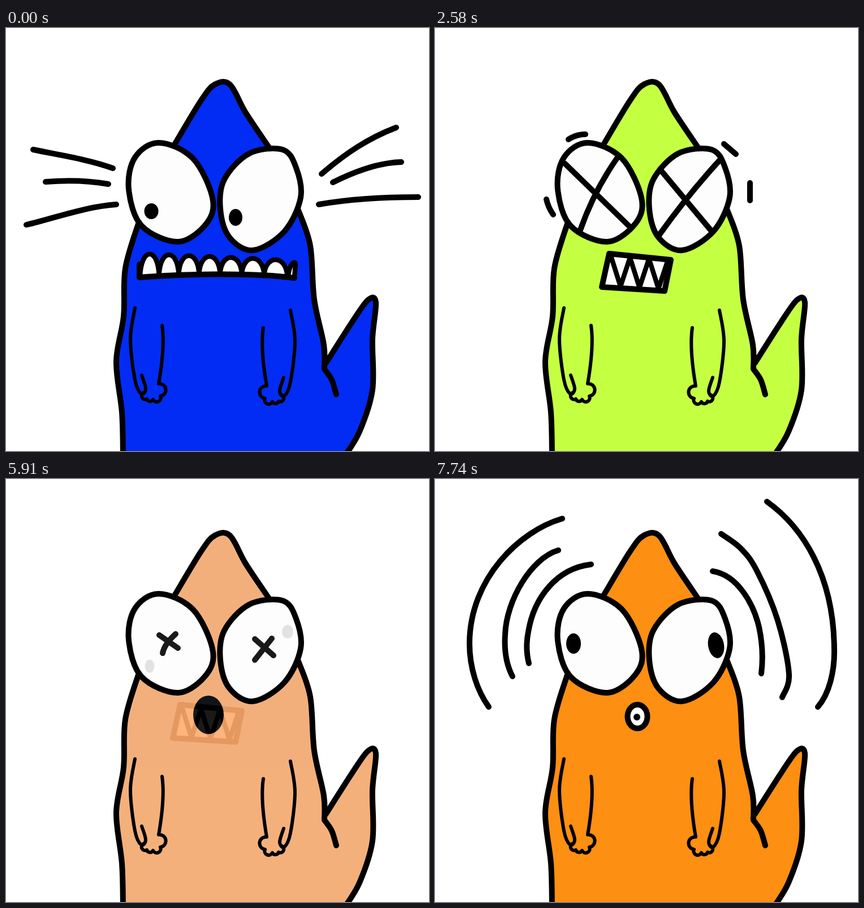
These frames come from a looping animation (748 by 748 pixels, 8000 ms). An HTML page:

```html
<!DOCTYPE html>
<html lang="en">
<head>
<meta charset="utf-8">
<title>Moody monster</title>
<style>
html, body { margin: 0; height: 100%; overflow: hidden; background: #fff; }
svg { display: block; width: 100vw; height: 100vh; }
.line { fill: none; stroke: #000; stroke-width: 10; stroke-linecap: round; stroke-linejoin: round; }
.thin { stroke-width: 6; }
.mid { stroke-width: 8.5; }
.white { fill: #fdfdfd; }
</style>
</head>
<body>
<svg id="stage" viewBox="0 0 748 748"></svg>
<script>
const pairs = text => text.split(', ').map(p => p.split(' ').map(Number));
const repeat = (n, part) => Array.from({ length: n }, (_, i) => part(i)).join('');

// Smooth curve through a few "x y, x y" points
function smooth(text, closed) {
  const p = pairs(text), n = p.length;
  const at = i => closed ? p[(i + n) % n] : p[Math.max(0, Math.min(n - 1, i))];
  let d = 'M' + p[0];
  for (let i = 0; i < (closed ? n : n - 1); i++) {
    const [a, b, c, e] = [at(i - 1), at(i), at(i + 1), at(i + 2)];
    const out = k => b[k] + (c[k] - a[k]) / 6, into = k => c[k] - (e[k] - b[k]) / 6;
    d += `C${out(0)} ${out(1)} ${into(0)} ${into(1)} ${c}`;
  }
  return d;
}
const line = (d, cls = '', move = '') => `<path class="line ${cls}" d="${d}" transform="${move}"/>`;
const oval = (x, y, rx, ry, turn = 0, cls = '') =>
  `<ellipse class="${cls}" cx="${x}" cy="${y}" rx="${rx}" ry="${ry}" transform="rotate(${turn} ${x} ${y})"/>`;

// Body
const left = smooth('207 760, 205 680, 195 590, 208 510, 211 425, 235 343');
const head = smooth('298 206, 345 128, 369 100, 396 100, 424 150, 465 211');
const right = smooth('517 322, 538 385, 545 480, 562 560, 563 603');
const tail = smooth('566 592, 612 520, 640 481, 654 485, 648 550, 648 640, 625 714, 597 760');
const hook = smooth('563 603, 576 622, 584 648');
const skin = left + [head, right, tail].map(d => d.replace('M', 'L')).join('') + 'Z';
const eyes = smooth('270 203, 228 229, 217 285, 240 350, 305 378, 355 345, 365 300, 330 230', true)
  + smooth('489 215, 430 222, 386 268, 379 320, 395 370, 437 393, 492 360, 521 300, 513 247', true);
const arm = smooth('228 495, 220 550, 228 622, 239 647, 247 638, 240 614')
  + 'M243 645A6 6 0 0 0 249 656A6 6 0 0 0 260 657A6.5 6.5 0 0 0 273 651A9 9 0 0 0 270 629C275 600 281 560 276 526';

// Mouths
const toothX = i => 237 + 33 * i + 0.6 * i * i;
const toothBase = i => 435 + 0.35 * (i - 3.5) ** 2;
const tooth = i => {
  const x = toothX(i), end = toothX(i + 1), peak = 387 + 2.2 * i;
  return `M${x} ${toothBase(i)}C${x + 2} ${peak} ${end - 2} ${peak} ${end} ${toothBase(i + 1)}`;
};
const wideTeeth = line(repeat(7, tooth) + 'M499 438C502 414 511 412 512 417L510 441', 'mid white')
  + line('M236 418V441C300 436 430 431 510 442');
const stitches = line('M279 420L398 421' + repeat(6, i => `M${294 + 20.5 * i} 403l-3 ${i % 5 ? 31 : 39}`));
const fangs = line('M308 399L417 410L406 465L295 458Z', 'white')
  + line('M311 403' + repeat(6, i => `L${328 + 16.8 * i} ${i % 2 ? 405 + i : 457 + i}`), 'mid');
const bar = i => {
  const x = 313 + 21.5 * i, h = 30 * Math.sqrt(1 - ((x - 363) / 76) ** 2);
  return `M${x} ${435 - h}L${x + 1} ${435 + h}`;
};
const grid = oval(363, 435, 76, 30, -2, 'line white') + line('M287 436L439 430' + repeat(6, bar), 'mid');
const gape = oval(358, 417, 27, 34);
const whistle = oval(358, 420, 17.5, 21, 0, 'line white') + oval(357, 421, 6, 6);

// Marks around the body
const whiskers = line('M48 215C90 224 145 232 189 248M70 272Q130 267 181 276M36 348C90 335 140 316 195 312'
  + 'M558 258C600 222 640 195 690 176M578 273C620 252 660 238 699 237M553 312C610 302 670 299 729 299');
const dashes = line('M236 197Q250 188 266 188M197 303Q200 317 209 330M511 205L532 223M557 274V305');
const waves = line([
  '56 94, 65 141, 128 170, 133 230, 184 255, 180 292',
  '166 34, 199 56, 200 104, 247 138, 240 176',
  '306 10, 316 36, 349 56, 337 101',
  '458 10, 465 20, 446 45, 471 78, 445 108',
  '598 68, 601 88, 558 130, 573 175, 523 201',
  '689 156, 684 188, 618 230, 608 296, 564 326'
].map(p => smooth(p)).join(''));
const arcs = line('M225 70C150 92 62 175 61 290C61 335 75 375 95 403M218 126C170 140 126 215 124 275C122 305 127 330 137 349'
  + 'M276 151C215 158 175 210 165 270C161 290 162 310 166 326M587 40C650 85 705 170 706 300C707 340 697 380 677 403'
  + 'M491 163C535 170 563 220 573 262C579 290 580 320 577 344'
  + smooth('506 97, 540 122, 569 162, 606 250, 626 345, 614 386'));

// Rounded stones of one size, each tilted a little differently
const stones = (w, h, lean, spots) => pairs(spots).map(([x, y], i) =>
  `<rect class="line" x="${x - w / 2}" y="${y - h / 2}" width="${w}" height="${h}" rx="6" transform="rotate(${lean + 5 * Math.sin(i * 2)} ${x} ${y})"/>`).join('');
const wall = stones(26, 28, 0, '219 160, 216 210, 176 249, 189 292, 150 306, 195 346, 189 404, 144 467, 169 527, 119 583, 145 647, 633 445, 648 732')
  + stones(28, 43, -4, '338 72, 393 52, 442 107, 497 152, 550 171, 540 235, 575 296, 563 363, 573 429, 586 489, 682 505, 681 594, 677 673')
  + stones(38, 42, 0, '281 125, 105 710, 166 709, 610 357, 704 725');

const upOut = oval(242, 252, 11.5, 14.5, 15) + oval(488, 271, 11, 13);
const crosses = line('M230 240L345 352M322 230Q280 290 256 360M398 250L488 358M505 232Q447 295 395 368');
const smallCrosses = line('M271 276L304 299M300 274Q280 292 277 308M440 283L473 312M470 282L440 320');

const moods = [
  { color: '#022cf3', look: oval(257, 324, 12.5, 14) + oval(406, 335, 12, 15), mouth: wideTeeth, marks: whiskers },
  { color: '#ffaaab', look: upOut, mouth: stitches, marks: '' },
  { color: '#c5ff42', look: crosses, mouth: fangs, marks: dashes },
  { color: '#ff1612', look: upOut, mouth: grid, marks: waves },
  { color: '#ffac6c', look: smallCrosses, mouth: gape, marks: '' },
  { color: '#8fcdff', look: oval(254, 331, 8.5, 11.5) + oval(498, 270, 10, 12), mouth: fangs, marks: wall },
  { color: '#fd8f12', look: oval(245, 291, 13, 18) + oval(497, 294, 14, 23, -10), mouth: whistle, marks: arcs }
];

stage.innerHTML =
  moods.map(m => `<g class="mood"><path d="${skin}" fill="${m.color}"/><path class="white" d="${eyes}"/>${m.look}${m.mouth}</g>`).join('')
  + moods.map(m => `<g class="marks">${m.marks}</g>`).join('')
  + line(left + head + right + tail + hook + eyes)
  + line(arm, 'thin') + line(arm, 'thin', 'translate(731 4) scale(-1 1)');

const faces = stage.querySelectorAll('.mood'), marks = stage.querySelectorAll('.marks');
const LOOP = 8000, HOLD = 750, STEP = 60, CYCLE = HOLD + 9 * STEP;

function draw(now) {
  const t = now % LOOP, current = Math.floor(t / CYCLE), inside = t % CYCLE;
  const step = inside < HOLD ? 0 : Math.floor((inside - HOLD) / STEP) + 1;
  moods.forEach((_, i) => {
    const mix = i === current ? 1 : i === current + 1 ? step / 10 : 0;
    faces[i].setAttribute('opacity', mix);
    // marks on the bare background switch instead of fading
    marks[i].setAttribute('opacity', mix > 0.5 ? 1 : 0);
  });
}
const start = performance.now();
function tick() {
  draw(performance.now() - start);
  requestAnimationFrame(tick);
}
tick();
</script>
</body>
</html>
```
